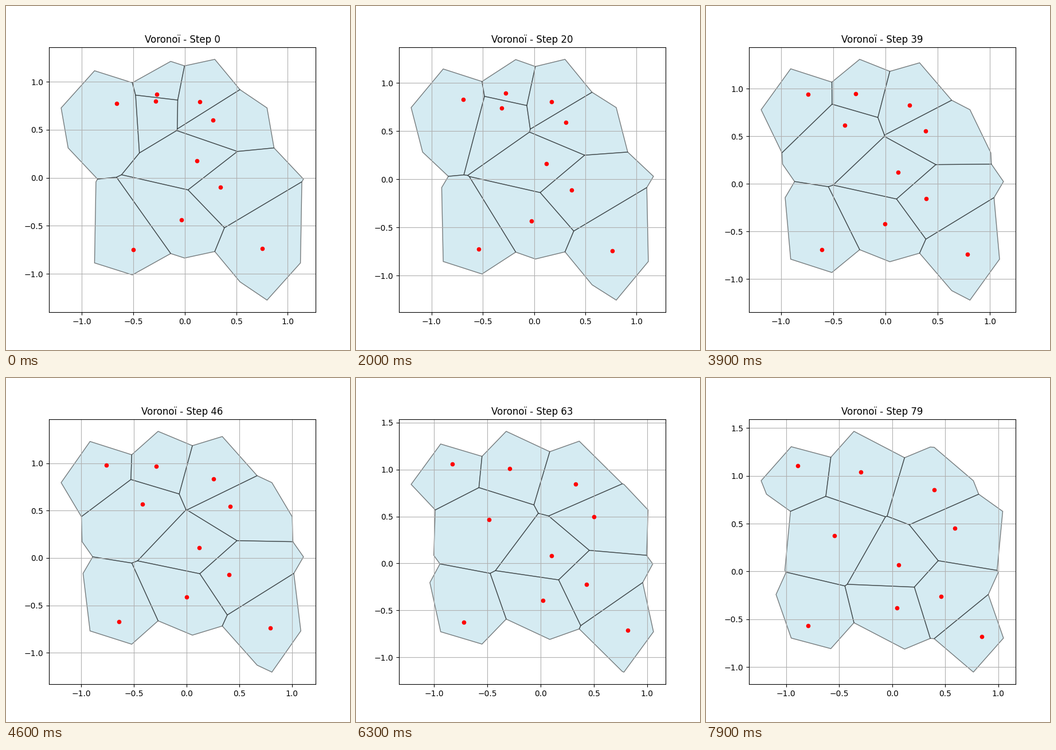
Recreate the animation shown at these times as a matplotlib script. Size 600 by 600 pixels, loop 8 s.

```python
import matplotlib.pyplot as plt
from matplotlib.animation import FuncAnimation

STEPS = 80
PERIOD = 2    # the cells tile a torus of side 2
RATE = 0.001  # velocity gained per unit of force in one step

START = [-.664 + .776j, -.274 + .871j, -.283 + .7995j, .145 + .7935j,
         .2735 + .6025j, .117 + .1786j, .346 - .096j, -.033 - .436j,
         -.502 - .747j, .753 - .735j]


def dot(a, b):
    return (a * b.conjugate()).real


def clip(edges, p, q, owner):
    """Cut a polygon of (corner, owner of the side leaving it) by a bisector."""
    mid, normal = (p + q) / 2, q - p
    out = []
    for (a, own), (b, _) in zip(edges, edges[1:] + edges[:1]):
        sa, sb = dot(a - mid, normal), dot(b - mid, normal)
        if sa <= 0:
            out.append((a, own))
        if (sa <= 0) != (sb <= 0):
            cut = a + (b - a) * sa / (sa - sb)
            out.append((cut, (owner, q) if sa <= 0 else own))
    return out


def voronoi(pts):
    tiled = [(k, p + PERIOD * complex(i, j)) for k, p in enumerate(pts)
             for i in (-1, 0, 1) for j in (-1, 0, 1)]
    cells = []
    for p in pts:
        cell = [(p + 2 * c, None) for c in (-1 - 1j, 1 - 1j, 1 + 1j, -1 + 1j)]
        near = sorted(tiled, key=lambda t: abs(t[1] - p))[1:40]
        for k, q in near:
            cell = clip(cell, p, q, k)
        cells.append(cell)
    return cells


def sides(cell):
    for (a, own), (b, _) in zip(cell, cell[1:] + cell[:1]):
        yield a, b, own


def area(cell):
    return sum((a.conjugate() * b).imag for a, b, _ in sides(cell)) / 2


def forces(pts, cells):
    """Downhill direction of half the sum of squared cell areas."""
    areas = [area(c) for c in cells]
    out = []
    for i, (p, cell) in enumerate(zip(pts, cells)):
        out.append(sum((areas[k] - areas[i]) * abs(b - a) / abs(q - p)
                       * ((a + b) / 2 - p) for a, b, (k, q) in sides(cell)))
    return out


def simulate():
    """Frictionless motion of the sites towards equal areas."""
    pts, states = START, []
    cells = voronoi(pts)
    vel = [2 * RATE * f for f in forces(pts, cells)]
    for _ in range(STEPS):
        states.append((pts, cells))
        vel = [v + RATE * f for v, f in zip(vel, forces(pts, cells))]
        pts = [p + v for p, v in zip(pts, vel)]
        cells = voronoi(pts)
    return states


STATES = simulate()
fig, ax = plt.subplots(figsize=(6, 6), dpi=100)


def draw(step):
    ax.clear()
    pts, cells = STATES[step]
    for cell in cells:
        ax.fill([z.real for z, _ in cell], [z.imag for z, _ in cell],
                facecolor="lightblue", edgecolor="black", alpha=0.5)
    ax.scatter([p.real for p in pts], [p.imag for p in pts],
               s=20, color="red", zorder=3)
    ax.set_title(f"Voronoï - Step {step}")
    ax.grid(True)
    return []


anim = FuncAnimation(fig, draw, frames=STEPS, init_func=lambda: [],
                     interval=100, repeat=True, repeat_delay=0)
plt.show()
```
